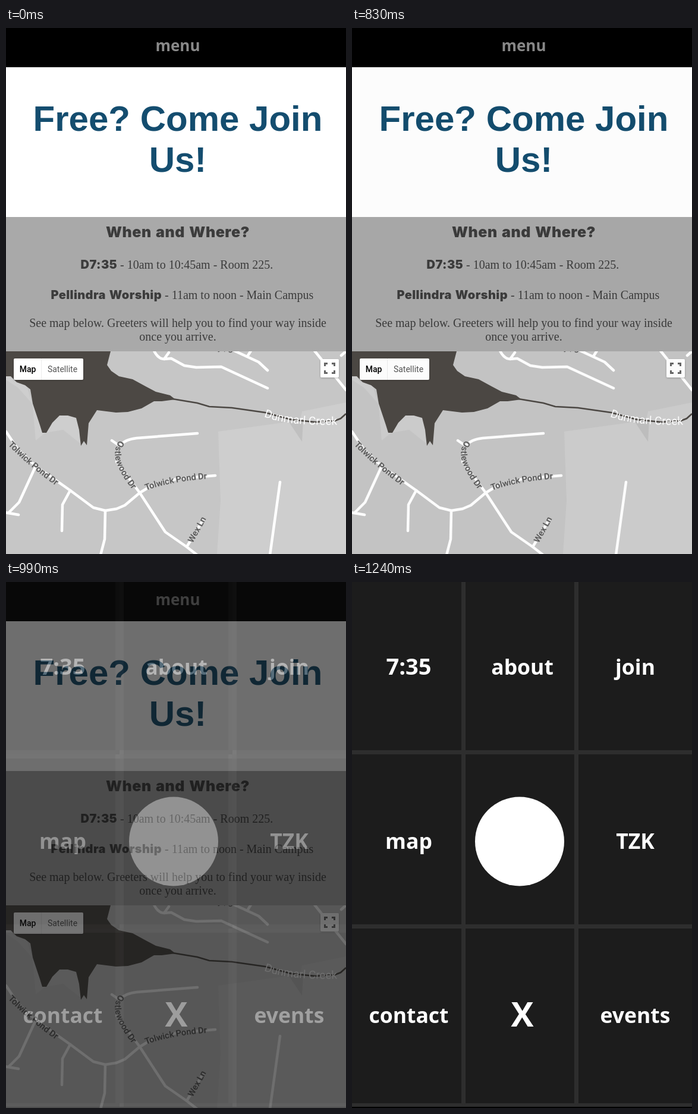
Write an HTML page that moves like this. It is 572 px wide and 885 px high and loops after 1.76 s.

```html
<!DOCTYPE html>
<html lang="en">
<head>
<meta charset="utf-8">
<title>Menu overlay</title>
<style>
  html, body { margin: 0; width: 100%; height: 100%; overflow: hidden; background: #000; }
  svg { display: block; width: 100vw; height: 100vh; }
  text { white-space: pre; }
  .nav { font: 600 26px "Noto Sans", "Open Sans", sans-serif; text-anchor: middle; }
  .title { font: bold 60px "Liberation Sans", Arial, sans-serif; fill: #144d6f; text-anchor: middle; }
  .black { font: 900 20px Inter, "Arial Black", sans-serif; letter-spacing: .02em; word-spacing: .08em; fill: #3c3c3c; }
  .serif { font: 20px "Liberation Serif", "Times New Roman", serif; fill: #3c3c3c; }
  .mid { text-anchor: middle; }
  .end { text-anchor: end; }
  .road { fill: none; stroke: #fff; stroke-width: 4.5; stroke-linecap: round; stroke-linejoin: round; }
  .street { font: 500 14.5px Roboto, sans-serif; fill: #565656; stroke: #c6c6c6; stroke-width: 2; paint-order: stroke; }
  .creek { font: 19px Roboto, sans-serif; fill: #fff; }
  .ui { font: 14px Roboto, sans-serif; text-anchor: middle; }
</style>
</head>
<body>
<svg viewBox="0 0 572 885" preserveAspectRatio="none">
  <defs>
    <clipPath id="mapClip"><rect y="544" width="572" height="341"/></clipPath>
    <filter id="lift" x="-20%" y="-20%" width="140%" height="150%">
      <feDropShadow dx="0" dy="1" stdDeviation="1.5" flood-opacity=".25"/>
    </filter>
    <path id="westLine" d="M7 698Q42 735 98 774"/>
    <path id="eastLine" d="M236 778Q275 763 345 758"/>
    <path id="northLine" d="M195 696C180 712 186 738 222 782"/>
    <path id="laneLine" d="M314 867L338 824"/>
    <path id="creekLine" d="M434 654Q478 671 566 667"/>
  </defs>

  <rect width="572" height="66"/>
  <text id="menu" class="nav" x="289" y="39">menu</text>
  <rect y="66" width="572" height="252" fill="#fff"/>
  <text class="title" x="289" y="173">Free? Come Join</text>
  <text class="title" x="289" y="242">Us!</text>

  <rect y="318" width="572" height="226" fill="#a9a9a9"/>
  <text class="black mid" x="289" y="352" style="font-size:25px">When and Where?</text>
  <text class="black end" x="187" y="405">D7:35</text>
  <text class="serif" x="192" y="405">- 10am to 10:45am - Room 225.</text>
  <text class="black end" x="262" y="456">Pellindra Worship</text>
  <text class="serif" x="267" y="456">- 11am to noon - Main Campus</text>
  <text class="serif mid" x="289" y="503">See map below. Greeters will help you to find your way inside</text>
  <text class="serif mid" x="289" y="526">once you arrive.</text>

  <g clip-path="url(#mapClip)">
    <rect y="544" width="572" height="341" fill="#c6c6c6"/>
    <g fill="#cecece">
      <path d="M357 679L495 660 498 645 572 630V885H355L361 795Z"/>
      <path d="M42 605L50 694 66 681 96 676 126 700 136 690V645Z"/>
      <path d="M0 584H30L44 632 20 605 0 592Z"/>
    </g>
    <path d="M476 663L500 659 498 696Z" fill="#c0c0c0"/>
    <path fill="#4c4844" d="M0 544H176L170 567 177 577 190 586 213 591 235 603 252 612 276 618 285 625 262 628 249 628
      228 640 205 646 185 647 153 643 139 665 136 702 131 695 126 703 123 676 118 656 104 652 90 652 78 664
      68 681 61 681 57 668 45 632 41 608 32 601 18 596 8 586H0Z"/>
    <path fill="none" stroke="#4c4844" stroke-width="2.7" d="M280 624L322 631 342 637 380 639 436 647 480 659 520 663 553 661 563 657 572 649"/>
    <g class="road">
      <path d="M0 679L20 709 50 737 108 778 147 807 167 812 186 809 200 803 225 782 250 767 290 758 352 753"/>
      <path d="M50 737L22 798 5 815M-2 815L21 819M108 778L95 802 94 846M167 812L166 860 159 887"/>
      <path d="M225 782L268 848 304 873 322 887M304 873L332 827M461 764L444 887"/>
      <path d="M178 694L191 703 186 730 205 755 225 782M191 703Q200 692 220 690L322 682"/>
      <path d="M249 543Q256 557 266 557L278 556 300 568 320 571 362 570 440 606M266 557L274 546"/>
      <path d="M384 543L425 562 440 576M407 551L412 543M519 543L572 609M564 551L573 543"/>
    </g>
    <text class="street" x="356" y="542" transform="rotate(3 356 542)">y , g</text>
    <text class="street" dy="5"><textPath href="#westLine">Tolwick Pond Dr</textPath></text>
    <text class="street"><textPath href="#eastLine">Tolwick Pond Dr</textPath></text>
    <text class="street" dy="4"><textPath href="#northLine">Ostlewood Dr</textPath></text>
    <text class="street"><textPath href="#laneLine">Wex Ln</textPath></text>
    <text class="creek"><textPath href="#creekLine">Dunmarl Creek</textPath></text>

    <rect x="13" y="556" width="117" height="36" rx="2" fill="#fff" filter="url(#lift)"/>
    <path d="M59.5 556V592" stroke="#ececec"/>
    <text class="ui" x="36.5" y="579" style="font-weight:500">Map</text>
    <text class="ui" x="95" y="579" fill="#565656">Satellite</text>
    <rect x="529" y="557" width="31" height="31" rx="2" fill="#fff" filter="url(#lift)"/>
    <path d="M536.5 569V564.5H541M548 564.5H552.5V569M552.5 576V580.5H548M541 580.5H536.5V576"
      fill="none" stroke="#666" stroke-width="3"/>
  </g>

  <g id="overlay"><rect width="572" height="885"/></g>
</svg>
<script>
const LOOP = 1760;
const HOVER = [510, 830];
const FADE = [[0, 0], [830, .007], [920, .16], [990, .6], [1070, .86], [1150, .97], [1240, 1]];

const cols = [[0, 184], [191, 183], [381, 191]];
const rows = [[0, 283, 156], [290, 286, 449], [583, 294, 742]];
const centers = [95.5, 286.5, 476.5];
const labels = [["7:35", "about", "join"], ["map", "", "TZK"], ["contact", "X", "events"]];

const overlay = document.getElementById("overlay");
const menu = document.getElementById("menu");

function add(parent, tag, attrs, text = "") {
  const el = document.createElementNS("http://www.w3.org/2000/svg", tag);
  for (const key in attrs) el.setAttribute(key, attrs[key]);
  el.textContent = text;
  return parent.appendChild(el);
}

// Each border is twice the gap wide and runs under the next cell.
const cells = rows.flatMap(([y, height, base], r) => cols.map(([x, width], c) => {
  const cell = add(overlay, "g", {});
  const edge = r === 2 ? 6 : 14;
  add(cell, "rect", { x, y, width: width + 14, height: height + edge, fill: "#2e2e2e" });
  add(cell, "rect", { x, y, width, height, fill: "#1c1c1c" });
  const label = labels[r][c];
  if (!label) {
    add(cell, "circle", { cx: 282, cy: 436.5, r: 75, fill: "#fff" });
    return cell;
  }
  const big = label === "X";
  const size = big ? 57 : label === "7:35" ? 38 : 35.5;
  add(cell, "text", {
    class: "nav", x: centers[c], y: big ? 748 : base, fill: "#fff", style: `font-size:${size}px`
  }, label);
  return cell;
}));

function draw(ms) {
  const t = ms % LOOP;
  const alpha = FADE.findLast(([start]) => t >= start)[1];
  menu.setAttribute("fill", t >= HOVER[0] && t < HOVER[1] ? "#fff" : "#8a8a8a");
  overlay.setAttribute("opacity", alpha);
  // The cells lag a little behind the black backdrop.
  for (const cell of cells) cell.setAttribute("opacity", alpha ** 1.3);
}

const begin = performance.now();
function tick() {
  draw(performance.now() - begin);
  requestAnimationFrame(tick);
}
tick();
</script>
</body>
</html>
```
